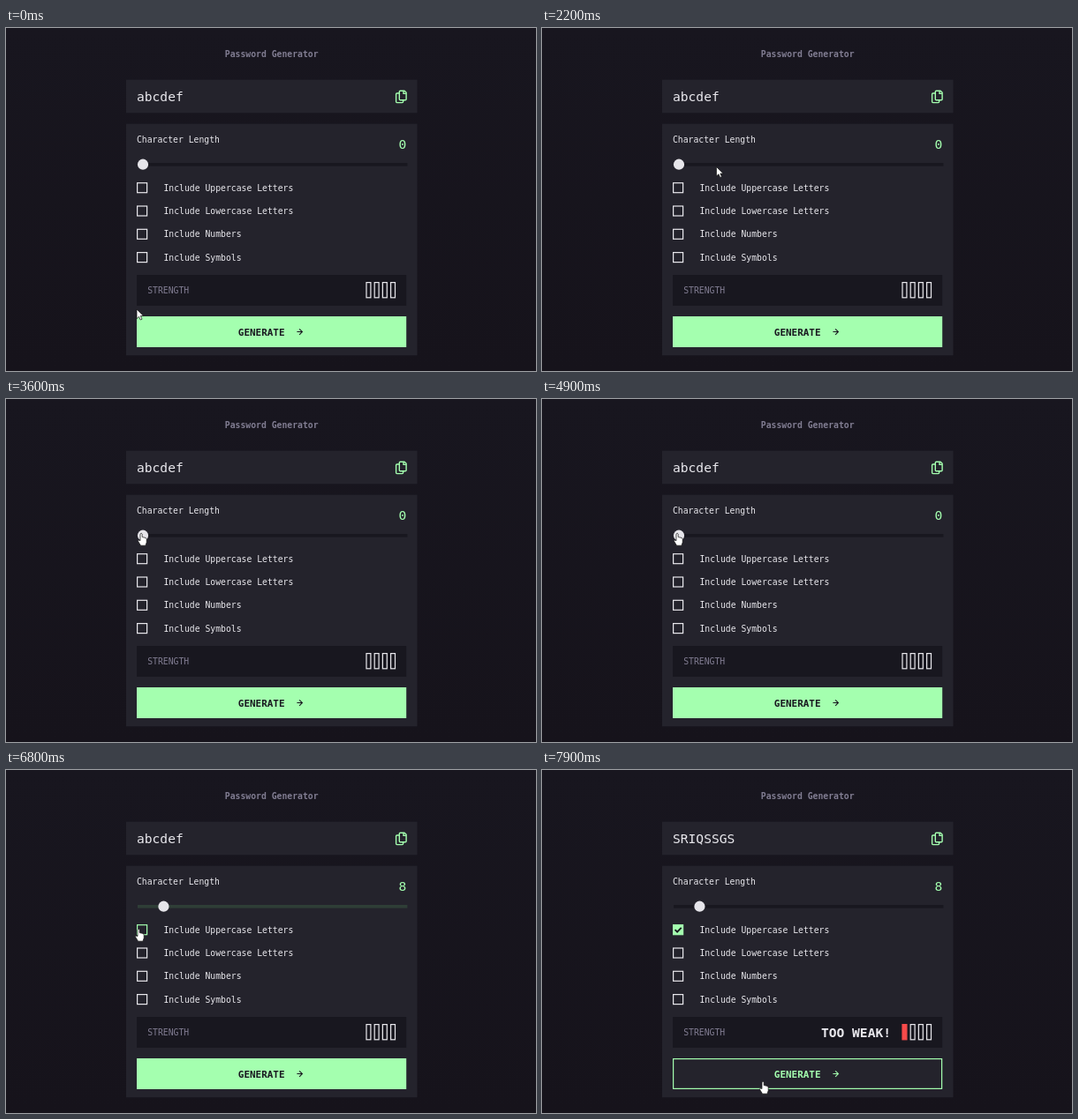
Animation of 600 by 389 pixels, one loop 8000 ms. Source, as an HTML page:

```html
<!DOCTYPE html>
<html lang="en">
<head>
<meta charset="utf-8">
<title>Password Generator</title>
<style>
  :root { --green: #a4ffaf; --light: #e9e8ed; --panel: #24232c; --dark: #18171f; --grey: #817d92; }
  html, body { margin: 0; width: 100%; height: 100%; overflow: hidden; background: var(--dark); }
  svg { display: block; width: 600px; height: 389px; }
  text { font: 400 9.75px "DejaVu Sans Mono", "Noto Sans Mono", monospace; fill: var(--light); white-space: pre; }
  .big { font-size: 14.6px; }
  .bold { font-weight: 700; }
  .grey { fill: var(--grey); }
  .panel { fill: var(--panel); }
  .dark { fill: var(--dark); }
  .box { fill: none; stroke: var(--light); stroke-width: 1.2; }
  .icon { fill: none; stroke: var(--green); stroke-width: 1.4; stroke-linejoin: round; }
  #count { fill: var(--green); }
  #button rect { fill: var(--green); stroke: var(--green); stroke-width: 1.2; }
  #button text { font-size: 10.95px; fill: var(--dark); }
  #button path { fill: var(--dark); }
  #button.hover rect { fill: none; }
  #button.hover text, #button.hover path { fill: var(--green); }
  #tick { fill: none; stroke: var(--dark); stroke-width: 1.9; }
  .box.hover { stroke: var(--green); }
  .box.on { stroke: var(--green); fill: var(--green); }
  .weak { fill: #f64a4a; stroke: #f64a4a; }
  #cursor path { fill: #fff; stroke: #111; stroke-width: .7; stroke-linejoin: round; }
</style>
</head>
<body>
<svg viewBox="0 0 600 389">
  <defs>
    <linearGradient id="sky" x2="0" y2="1">
      <stop stop-color="#18161f"/><stop offset="1" stop-color="#16131b"/>
    </linearGradient>
  </defs>
  <rect width="600" height="389" fill="url(#sky)"/>
  <text class="grey bold" x="300.7" y="32.6" text-anchor="middle">Password Generator</text>

  <rect class="panel" x="136" y="58.7" width="329.5" height="37.6"/>
  <text id="password" class="big" x="148" y="82.8"></text>
  <g class="icon">
    <path d="M445.3 74h-2.7a1 1 0 0 0-1 1v8.6a1 1 0 0 0 1 1h6a1 1 0 0 0 1-1v-1.8"/>
    <path d="M446.3 71.2h4.8l2 2v7.5a1 1 0 0 1-1 1h-5.8a1 1 0 0 1-1-1v-8.5a1 1 0 0 1 1-1z"/>
    <path d="M450 71.4v3h3"/>
  </g>

  <rect class="panel" x="136" y="108.7" width="329.5" height="262.6"/>
  <text x="148" y="130.3">Character Length</text>
  <text id="count" class="big" x="453.4" y="136.8" text-anchor="end"></text>
  <rect id="track" x="149" y="153" width="305.4" height="3.6"/>
  <circle id="thumb" cy="154.7" r="6.1" fill="#e6e5ea"/>

  <g id="options"></g>
  <path id="tick" d="M150.6 181.2l2.5 2.5 4.6-4.8"/>

  <rect class="dark" x="148" y="280" width="305.2" height="35"/>
  <text class="grey" x="160.2" y="301">STRENGTH</text>
  <text id="verdict" class="big bold" x="395" y="302.7" text-anchor="end">TOO WEAK!</text>
  <g id="bars"></g>

  <g id="button">
    <rect x="148.6" y="327.6" width="304" height="33.8"/>
    <text class="bold" x="262.8" y="348.8">GENERATE</text>
    <path transform="translate(329.4 340.9) scale(.611)" d="M5.1 12l6-6-6-6-1.3 1.3 3.9 3.8H0v1.8h7.7l-3.9 3.8z"/>
  </g>

  <g id="cursor">
    <path id="arrow" d="M0 0v10.6l2.5-2.3L4.2 12l1.8-.8-1.6-3.6h3.3z"/>
    <path id="hand" d="M-2 1.2Q-.8-.8.2 1.2V4.6L5.2 6V10.5L4 14.2H-1.5L-4.5 8.8Q-4-7.1-2 8.6z"/>
  </g>
</svg>
<script>
  const LOOP = 8000, STEP = 100;
  const $ = id => document.getElementById(id);

  const labels = ["Uppercase Letters", "Lowercase Letters", "Numbers", "Symbols"];
  $("options").innerHTML = labels.map((label, i) => {
    const y = 181.2 + i * 26.3;
    return `<rect class="box" x="148.6" y="${y - 5.5}" width="11" height="11"/>
      <text x="178.5" y="${y + 3.5}">Include ${label}</text>`;
  }).join("");
  $("bars").innerHTML = labels.map((_, i) =>
    `<rect class="box" x="${408 + i * 9.2}" y="288.6" width="4.9" height="17.2"/>`).join("");
  const check = $("options").querySelector("rect");
  const bar = $("bars").querySelector("rect");
  $("hand").setAttribute("d", "M-2 1.2Q-.8-.8.2 1.2V4.6L4 5.4Q5.4 6 5.2 7.6V10.5L4 14.2H-1.5L-4.5 9.2Q-4.4 7-2 8.6z");

  // pointer moves: from, to, x, y
  const moves = [
    [100, 700, 191, 290], [700, 1300, 246, 170], [1300, 1800, 196, 160],
    [2150, 2500, 222, 114], [2500, 3000, 168, 176], [3000, 3600, 154, 152],
    [4200, 4400, 154, 167], [4500, 4900, 154, 152], [5100, 5600, 179, 151],
    [5900, 6400, 151, 180], [7000, 7700, 251, 353]
  ];

  const ramp = (t, a, b) => Math.min(1, Math.max(0, (t - a) / (b - a)));
  const ease = k => k * k * (3 - 2 * k);
  const lerp = (a, b, k) => a + (b - a) * k;
  const show = (id, on) => $(id).style.display = on ? "" : "none";

  const pointer = t => moves.reduce(([x, y], [from, to, toX, toY]) => {
    const k = ease(ramp(t, from, to));
    return [lerp(x, toX, k), lerp(y, toY, k)];
  }, [148, 319]);

  function render(t) {
    const [x, y] = pointer(t);
    const count = Math.round(8 * ease(ramp(t, 5100, 5600)));
    const thumbX = 155 + 2.93 * count;
    const glow = ramp(t, 5000, 5200) - ramp(t, 6700, 6820);
    const checked = t >= 6900, done = t >= 7900;

    const onThumb = Math.hypot(x - thumbX, y - 154.7) < 7;
    const onCheck = Math.hypot(x - 154, y - 181) < 8;
    const onButton = y > 327;
    const hand = onThumb || onCheck || onButton;

    $("count").textContent = count;
    $("thumb").setAttribute("cx", thumbX);
    $("track").style.fill = `rgb(${[lerp(24, 164, glow), lerp(23, 255, glow), lerp(31, 175, glow)]})`;
    check.classList.toggle("hover", onCheck);
    check.classList.toggle("on", checked);
    show("tick", checked);
    $("button").classList.toggle("hover", onButton);
    $("password").textContent = done ? "SRIQSSGS" : "abcdef";
    show("verdict", done);
    bar.classList.toggle("weak", done);
    show("hand", hand);
    show("arrow", !hand);
    $("cursor").setAttribute("transform", `translate(${x} ${y})`);
  }

  const start = performance.now();
  function tick() {
    const t = (performance.now() - start) % LOOP;
    render(Math.floor(t / STEP) * STEP);
    requestAnimationFrame(tick);
  }
  tick();
</script>
</body>
</html>
```
